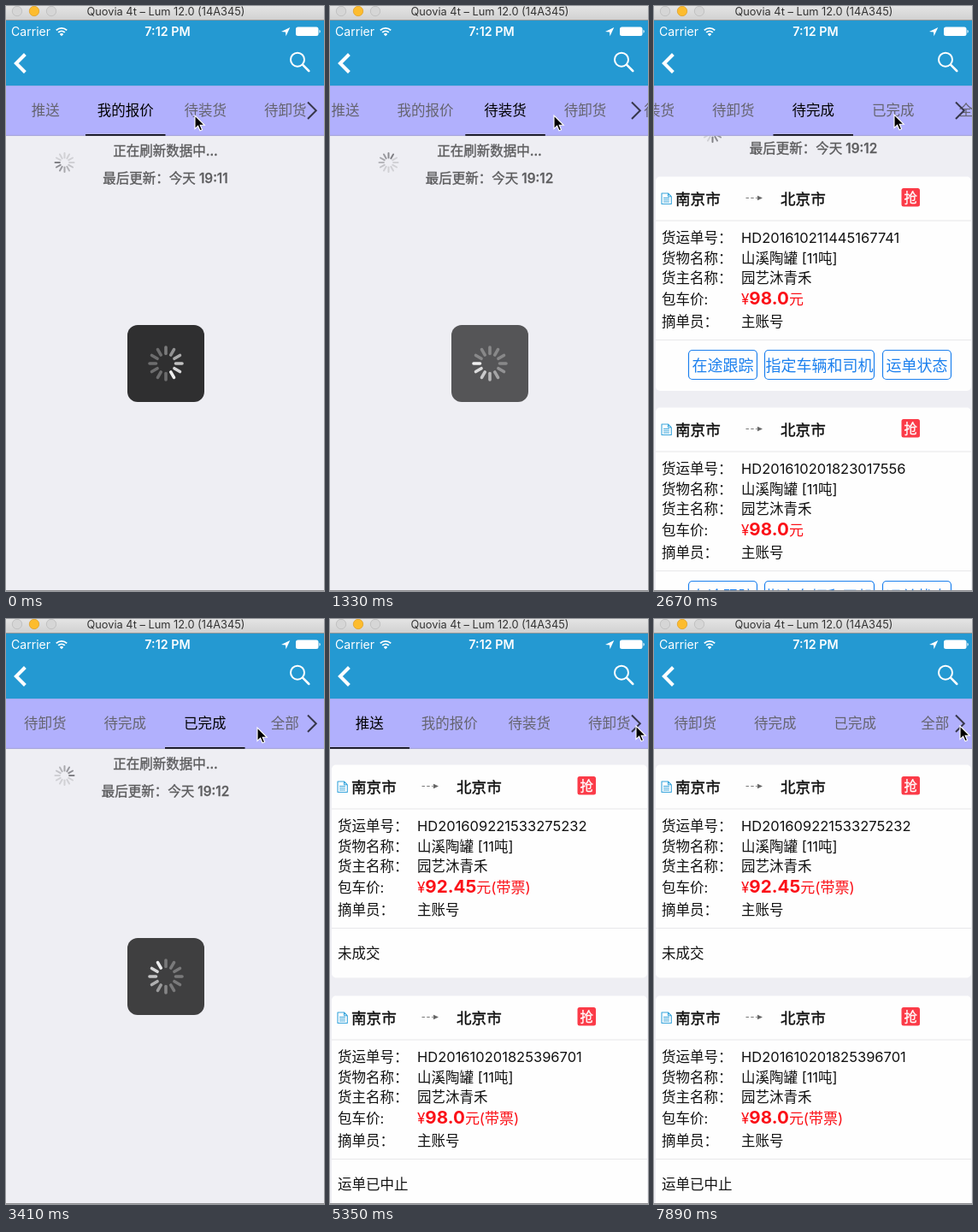
Recreate the animation shown at these times as an HTML page. Size 372x684 px, loop 8 s.

```html
<!DOCTYPE html>
<html lang="zh-CN">
<head>
<meta charset="utf-8">
<title>运单列表</title>
<style>
  html, body { margin: 0; width: 100%; height: 100%; overflow: hidden; background: #eeeef3; }
  svg { display: block; width: 372px; height: 684px; }
  text { font-family: Inter, "Noto Sans CJK SC", "Noto Sans CJK", sans-serif; font-size: 16.5px; fill: #111; white-space: pre; }
  .mid { text-anchor: middle; }
  .white { fill: #fff; }
  .tab { fill: #65646f; text-anchor: middle; }
  .tab.on { fill: #000; }
  .city { font-size: 17.6px; font-weight: 500; stroke: #111; stroke-width: .4; }
  .price { font-size: 17px; fill: #fb1118; }
  .sum { font-size: 20.6px; font-weight: 700; }
  .btn { font-size: 18px; fill: #1c80ee; text-anchor: middle; }
  .tip { font-size: 15.5px; font-weight: 500; fill: #5c5c5e; stroke: #5c5c5e; stroke-width: .35; text-anchor: middle; }
  .badge { font-size: 15.5px; text-anchor: middle; stroke-width: .3; }
  .line { fill: none; stroke-linecap: round; stroke-linejoin: round; }
</style>
</head>
<body>
<svg id="stage" viewBox="0 0 372 684"></svg>
<script>
const STEP = 148.8, LOOP = 8000, TAB_W = 93.5, PULL = 64;
const TABS = ['推送', '我的报价', '待装货', '待卸货', '待完成', '已完成', '全部'];

const text = (x, y, s, cls = '', more = '') => `<text x="${x}" y="${y}" class="${cls}" ${more}>${s}</text>`;
const rect = (x, y, w, h, fill, r = 0, more = '') =>
  `<rect x="${x}" y="${y}" width="${w}" height="${h}" rx="${r}" fill="${fill}" ${more}/>`;
const line = (d, color, w, more = '') => `<path class="line" d="${d}" stroke="${color}" stroke-width="${w}" ${more}/>`;

// Orders
const bid = (id, name, sum) => ({ id, name, sum, bid: true, unit: '元(带票)', foot: '已过期' });
const ride = id => ({ id, name: '', sum: '98.0', unit: '元' });
const LISTS = {
  bids: [bid('HD201611141526448422', '000', '111'), bid('HD201611141526268865', '333', '120')],
  rides: [ride('HD201610211445167741'), ride('HD201610201823017556')],
  all: [
    { id: 'HD201609221533275232', name: '', sum: '92.45', unit: '元(带票)', foot: '未成交' },
    { id: 'HD201610201825396701', name: '', sum: '98.0', unit: '元(带票)', foot: '运单已中止' }
  ]
};
const LIST_OF = ['all', 'bids', 'rides', 'rides', 'rides', 'all', 'all'];

function button(x, w, label) {
  return rect(x, 203, w, 34, 'none', 4.5, 'stroke="#1c80ee" stroke-width="1.2"') + text(x + w / 2, 227.2, label, 'btn');
}

function card(o, i) {
  const badge = o.bid
    ? rect(269.5, 13, 20, 20, 'none', 2, 'stroke="#f0822c" stroke-width="1.3"') + text(279.5, 28.8, '竞', 'badge', 'style="fill:#f0822c;stroke:#f0822c"')
    : rect(287.5, 13.5, 21.5, 21.5, '#fb3b48', 2.5) + text(298.2, 30, '抢', 'badge white', 'stroke="#fff"');
  const rows = [
    ['货运单号：', o.id],
    ['货物名称：', `山溪陶罐${o.name} [11吨]`],
    ['货主名称：', '园艺沐青禾'],
    [o.bid ? '我的报价：' : '包车价:', `¥<tspan class="sum">${o.sum}</tspan>${o.unit}`, 'price'],
    [o.bid ? '摘单员:' : '摘单员：', '主账号']
  ];
  const ys = [77.5, 101.3, 124.8, 149.5, 175.5];
  const foot = o.foot
    ? text(7, 226.8, o.foot)
    : button(38.5, 80, '在途跟踪') + button(127.5, 128, '指定车辆和司机') + button(265.5, 80, '运单状态');
  return `<g transform="translate(2 ${170.5 + 270 * i})">` +
    rect(0, 0, 369, o.foot ? 249 : 250.5, '#fefefe', 5) +
    line('M7 19.5H14.5L18.3 23.3V32H7ZM14.5 19.5V23.3H18.3M9.5 25H15.5M9.5 27.3H15.5M9.5 29.5H15.5', '#38a5dc', 1.1) +
    text(23, 32.3, '南京市', 'city') + text(146, 32.3, '北京市', 'city') +
    line('M105.5 25H118.5', '#777', 1.2, 'stroke-dasharray="3.4 2.4" style="stroke-linecap:butt"') +
    '<path d="M119 22.3L125 25L119 27.7Z" fill="#666"/>' + badge +
    rect(0, 51, 369, 1, '#e7e7ea') + rect(0, 190.5, 369, 1, '#e7e7ea') +
    rows.map(([k, v, cls], n) => text(7, ys[n], k) + text(100, ys[n], v, cls)).join('') + foot + '</g>';
}

function spinner(id, x, y, r0, r1, w, color) {
  let s = `<g id="${id}" transform="translate(${x} ${y})">`;
  for (let i = 0; i < 12; i++) s += line(`M0 ${-r0}V${-r1}`, color, w, `transform="rotate(${i * 30})"`);
  return s + '</g>';
}

const light = (x, fill, edge) => `<circle cx="${x}" cy="6" r="5.7" fill="${fill}" stroke="${edge}" stroke-width=".8"/>`;

document.getElementById('stage').innerHTML = `
  <defs>
    <linearGradient id="bar" x2="0" y2="1"><stop stop-color="#e4e4e4"/><stop offset="1" stop-color="#d0d0d0"/></linearGradient>
    <clipPath id="body"><rect y="151.5" width="372" height="533"/></clipPath>
  </defs>
  ${rect(0, 0, 372, 684, '#eeeef3')}
  <g clip-path="url(#body)">
    <g id="head">
      ${spinner('small', 68.5, 183, 5.6, 11, 2, '#77777c')}
      ${text(186.5, 174.6, '正在刷新数据中...', 'tip')}
      ${text(186.5, 206.6, '', 'tip', 'id="stamp"')}
    </g>
    <g id="lists">${Object.keys(LISTS).map(k => `<g id="${k}">${LISTS[k].map(card).join('')}</g>`).join('')}</g>
  </g>
  <g id="hud">${rect(142, 373, 90, 90, '#000', 12, 'fill-opacity=".8"')}${spinner('big', 187, 418, 11.5, 19, 3.6, '#fff')}</g>
  ${rect(0, 93, 372, 58.5, '#b1b0fd')}
  ${rect(0, 93, 372, 1, '#9fabec')}
  ${rect(0, 150.8, 372, 1, '#a3a2d6')}
  <g id="strip">
    ${TABS.map((s, i) => text((i + .5) * TAB_W - .5, 128, s, 'tab')).join('')}
    ${rect(0, 150, TAB_W, 1.6, '#000', 0, 'id="mark"')}
  </g>
  ${line('M353 112.5L362.8 122.2L353 132', '#37374a', 2, 'style="stroke-linecap:butt;stroke-linejoin:miter"')}
  ${rect(0, 17, 372, 76, '#2499d2')}
  ${rect(0, 0, 372, 17, 'url(#bar)')}
  ${rect(0, 16, 372, 1, '#8f969a')}
  ${light(13, '#d6d6d6', '#bcbcbc')}${light(33, '#fdbc2e', '#e0a12a')}${light(53, '#d6d6d6', '#bcbcbc')}
  ${text(187, 11, 'Quovia 4t – Lum 12.0 (14A345)', 'mid', 'style="font-size:12.8px;fill:#333"')}
  ${text(6, 35, 'Carrier', 'white', 'style="font-size:14.1px"')}
  ${text(189, 35, '7:12 PM', 'mid white', 'style="font-size:14.3px;font-weight:600"')}
  ${line('M58.8 28.4A9 9 0 0 1 71.2 28.4M61.2 30.9A5.5 5.5 0 0 1 68.8 30.9', '#fff', 1.9, 'style="stroke-linecap:butt"')}
  <path d="M65 35.2L62.8 32.9A3 3 0 0 1 67.2 32.9Z" fill="#fff"/>
  <path d="M322 30L332.3 25L327.5 35.2L327 30.4Z" fill="#fff"/>
  ${rect(339, 24.5, 26.5, 10.5, '#fff', 2.5)}<path d="M366.5 27.8a2.2 2.2 0 0 1 0 4z" fill="#fff"/>
  ${line('M22.4 56.5L11.9 67L22.4 77.5', '#fff', 4, 'style="stroke-linecap:butt;stroke-linejoin:miter"')}
  <circle cx="341" cy="62.7" r="8" fill="none" stroke="#fff" stroke-width="2"/>
  ${line('M347 68.7L354.3 76', '#fff', 2.5)}
  ${rect(0, 683, 372, 1, '#8d8d90')}
  <path id="cursor" d="M0 0V15.6L3.6 12.3L6 17.8L8.6 16.7L6.2 11.3H11.2Z" fill="#000" stroke="#fff" stroke-width="1.1"/>`;

const $ = id => document.getElementById(id);
const tabs = [...document.querySelectorAll('.tab')];

// [tab, step of the tap, step at which the data arrives]
const LOADS = [[1, -6, 6], [2, 8, 99], [3, 10, 11], [4, 15, 18], [5, 21, 25], [0, 31, 34]];
// [step, target offset of the tab strip]
const SCROLLS = [[8, 47], [10, 141], [15, 234], [21, 281], [31, 0], [38, 281], [45, 0], [49, 281], [53, 0]];
// [step, x, y]
const CURSOR = [[0, 221, 128], [6, 222, 130], [9, 262, 128], [10, 281, 127], [19, 286, 127], [20, 292, 127],
  [21, 294, 127], [27, 312, 122], [28, 342, 122], [29, 358, 125]];
const GLIDE = [.009, .6, 1], FADE = [.4, .8, .92, 1], RETRACT = [29, 3, 0];

const at = (list, i) => list[Math.min(i, list.length - 1)];
const move = (id, x, y) => $(id).setAttribute('transform', `translate(${x} ${y})`);
const show = (id, on) => { $(id).style.display = on ? '' : 'none'; };

// Every scroll but the latest has reached its target.
function stripOffset(k) {
  const done = SCROLLS.filter(s => s[0] <= k);
  if (!done.length) return 0;
  const [start, to] = done.pop();
  const from = done.length ? done.pop()[1] : 0;
  return from + (to - from) * at(GLIDE, k - start);
}

function spin(id, head, floor) {
  [...$(id).children].forEach((p, i) => {
    const age = (head - i + 24) % 12;
    p.setAttribute('stroke-opacity', Math.max(floor, .92 - age * .11));
  });
}

function draw(k) {
  const [tab, tap, ready] = LOADS.filter(l => l[1] <= k).pop();
  const busy = k < ready;
  const pull = busy ? PULL : at(RETRACT, k - ready);

  move('strip', -stripOffset(k), 0);
  tabs.forEach((t, i) => t.classList.toggle('on', i === tab));
  $('mark').setAttribute('x', tab * TAB_W - .5);

  show('head', pull > 0);
  move('head', 0, pull - PULL);
  $('stamp').textContent = '最后更新：今天 19:' + (tab === 1 && busy ? 11 : 12);
  show('lists', !busy);
  move('lists', 0, pull);
  for (const name in LISTS) show(name, name === LIST_OF[tab]);

  show('hud', busy);
  $('hud').setAttribute('opacity', at(FADE, k - tap));
  const head = Math.round(5 + k * 1.826) % 12;
  spin('big', head, .3);
  spin('small', (head + 4) % 12, .25);

  const [, x, y] = CURSOR.filter(c => c[0] <= k).pop();
  move('cursor', x, y);
}

let last = -1;
function tick(now) {
  const k = Math.floor((now % LOOP + 18) / STEP);
  if (k !== last) draw(last = k);
  requestAnimationFrame(tick);
}
draw(0);
requestAnimationFrame(tick);
</script>
</body>
</html>
```
